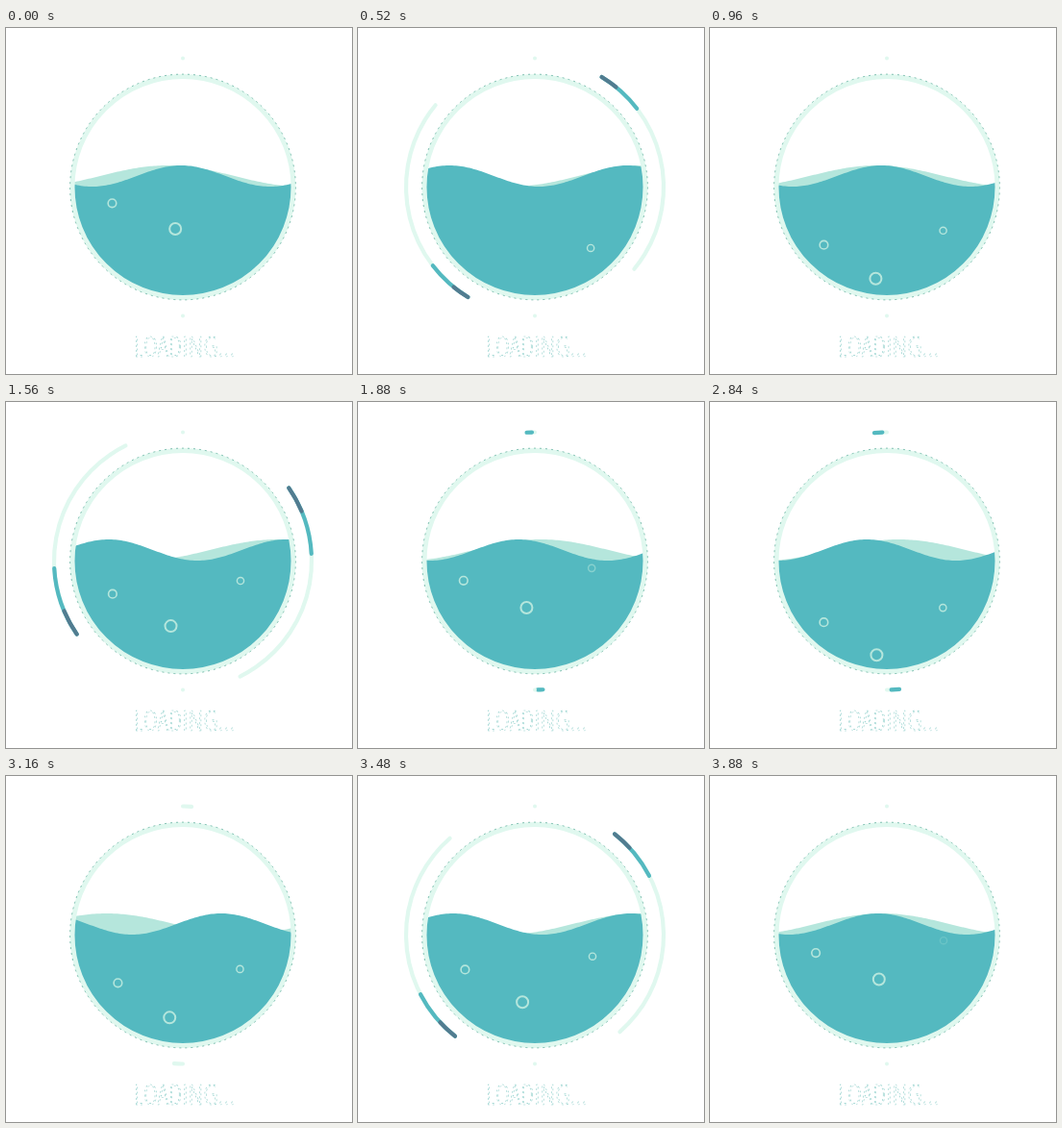
An HTML page with a canvas for the animation above (3920 ms loop, 360 by 360 pixels).

```html
<!DOCTYPE html>
<html lang="en">
<head>
<meta charset="utf-8">
<title>Loading</title>
<style>
  html, body { margin: 0; width: 100%; height: 100%; overflow: hidden; background: #fff; }
  canvas { display: block; width: 360px; height: 360px; }
</style>
</head>
<body>
<canvas id="stage" width="360" height="360"></canvas>
<script>
const canvas = document.getElementById('stage');
const ctx = canvas.getContext('2d');
const TAU = Math.PI * 2;
const LOOP = 3920, SWEEP = LOOP / 4, BUBBLE_LOOP = LOOP / 2;
const CX = 184, CY = 165.5, ORBIT = 134;
const MINT = '#e0f8ef', PALE = '#b5e6dc', TEAL = '#54b9c0', DARK = '#527c90', EDGE = '#4fa592';

function easeInOutCubic(u) {
  u = Math.min(1, Math.max(0, u));
  return u < 0.5 ? 4 * u ** 3 : 1 - 4 * (1 - u) ** 3;
}

// All arcs share a tail; each head leaves at its own time.
const tail = { delay: 239, duration: 807 };
const heads = [
  { color: MINT, delay: 85, duration: 740 },
  { color: TEAL, delay: 190, duration: 790 },
  { color: DARK, delay: 214, duration: 807 }
];

const bubbles = [
  { x: 114, y: 237, r: 4.3, width: 1.6, born: 700, life: 1430, rise: 62, power: 1, sway: 4.5, peak: 930 },
  { x: 173.5, y: 265, r: 6, width: 2, born: 790, life: 1690, rise: 92, power: 1.35, sway: 3.5, peak: 2150 },
  { x: 243, y: 243, r: 3.6, width: 1.4, born: 180, life: 1770, rise: 73, power: 1, sway: 1, peak: 1500 }
];

function ring(x, y, r, color, width) {
  ctx.beginPath();
  ctx.arc(x, y, r, 0, TAU);
  ctx.strokeStyle = color;
  ctx.lineWidth = width;
  ctx.stroke();
}

function wave(color, crest, length) {
  ctx.beginPath();
  ctx.moveTo(66, 290);
  for (let x = 66; x <= 302; x += 2) {
    ctx.lineTo(x, 154 - 11 * Math.cos(TAU * (x - crest) / length));
  }
  ctx.lineTo(302, 290);
  ctx.fillStyle = color;
  ctx.fill();
}

function drawBubble(b, time) {
  const t = time < b.born ? time + BUBBLE_LOOP : time;
  const age = t - b.born, left = b.life - age;
  if (left <= 0) return;
  const x = b.x + b.sway * Math.cos(TAU * (t - b.peak) / 1700);
  const y = b.y - b.rise * (age / b.life) ** b.power;
  ctx.globalAlpha = Math.min(1, age / 90, left / 130);
  ring(x, y, b.r, PALE, b.width);
  ctx.globalAlpha = 1;
}

function drawArcs(time) {
  const travel = part => Math.PI * easeInOutCubic((time - part.delay) / part.duration);
  const start = travel(tail);
  ctx.lineCap = 'round';
  ctx.lineWidth = 4.2;
  for (const turn of [-Math.PI / 2, Math.PI / 2]) {
    ctx.beginPath();
    ctx.arc(CX, CY + ORBIT * Math.sin(turn), 2, 0, TAU);
    ctx.fillStyle = MINT;
    ctx.fill();
    for (const head of heads) {
      const end = travel(head);
      if (end - start < 0.05) continue;
      ctx.beginPath();
      ctx.arc(CX, CY, ORBIT, turn + start + 0.01, turn + end - 0.01);
      ctx.strokeStyle = head.color;
      ctx.stroke();
    }
  }
  ctx.lineCap = 'butt';
}

function drawVessel() {
  ring(CX, CY, 115, MINT, 5);
  ctx.setLineDash([2, 4]);
  ring(CX, CY, 117.4, EDGE, 0.7);
  ctx.setLineDash([]);
}

function drawLabel() {
  ctx.font = '300 29.5px "Open Sans", sans-serif';
  ctx.fontStretch = 'condensed';
  ctx.lineWidth = 0.6;
  ctx.strokeStyle = '#86cbc6';
  ctx.setLineDash([2, 3]);
  ctx.strokeText('LOADING...', 133, 342);
  ctx.setLineDash([]);
}

function draw(time) {
  const sweep = time % SWEEP, turn = sweep / SWEEP;
  ctx.fillStyle = '#fff';
  ctx.fillRect(0, 0, 360, 360);

  ctx.save();
  ctx.beginPath();
  ctx.arc(CX, CY, 114, 0, TAU);
  ctx.clip();
  wave(PALE, 168 - 280 * turn, 280);
  wave(TEAL, 182 + 185 * turn, 185);
  for (const b of bubbles) drawBubble(b, time % BUBBLE_LOOP);
  ctx.restore();

  drawVessel();
  drawArcs(sweep);
  drawLabel();
}

const began = performance.now();
function tick() {
  draw(Math.max(0, performance.now() - began) % LOOP);
  requestAnimationFrame(tick);
}
tick();
</script>
</body>
</html>
```
